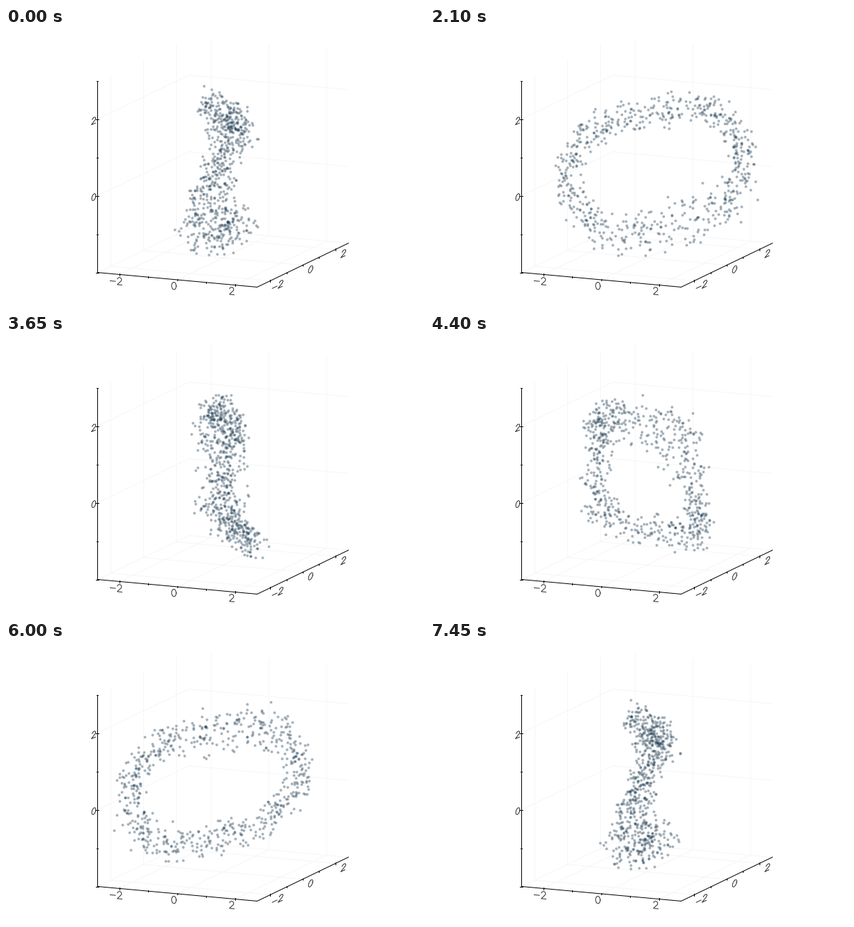
A matplotlib script that plays this animation: 600 by 400 pixels, repeating every 7500 ms.

```python
import numpy as np
import matplotlib.pyplot as plt
from matplotlib.animation import FuncAnimation

FRAMES, INTERVAL = 150, 50
COUNT = 680
PX = 0.72  # one pixel in points
XL, YL, Z0, Z1 = 2.76, 2.8, -2, 3
INK, GRID = "black", "#f6f6f6"

rng = np.random.default_rng(11)


def project(x, y, z):
    """Oblique view: data coordinates to stage pixels."""
    return 311.5 + 41.5 * x + 23.4 * y, 219.5 + 3.8 * x - 11.25 * y - 55 * z


def segment(a, b, color=INK, width=1.0, order=2):
    (xa, ya), (xb, yb) = project(*a), project(*b)
    ax.plot([xa, xb], [ya, yb], color=color, lw=width * PX, zorder=order)


def stroke(char):
    """Single-stroke digit of height 1, with its advance width."""
    if char == "0":
        t = np.linspace(0, 2 * np.pi, 40)
        return np.c_[0.33 + 0.31 * np.cos(t), 0.5 + 0.5 * np.sin(t)], 0.66
    if char == "2":
        t = np.linspace(np.radians(170), np.radians(-40), 20)
        arc = np.c_[0.32 + 0.28 * np.cos(t), 0.72 + 0.28 * np.sin(t)]
        return np.vstack([arc, [[0.02, 0], [0.66, 0]]]), 0.66
    return np.array([[0, 0.43], [0.72, 0.43]]), 0.95


def label(text, center, ex, ey):
    """Text lying along the direction ex, with uprights along ey."""
    glyphs = [stroke(c) for c in text]
    pen = -sum(w for _, w in glyphs) / 2
    for pts, width in glyphs:
        u, v = pts[:, 0] + pen, pts[:, 1] - 0.5
        ax.plot(center[0] + u * ex[0] + v * ey[0],
                center[1] + u * ex[1] + v * ey[1],
                color="#222222", lw=0.95 * PX, zorder=3)
        pen += width


def tick(p, size):
    x, y = project(*p)
    ax.plot([x, x], [y - size, y + size], color=INK, lw=PX, zorder=3)


def draw_box():
    for v in (-2, 0, 2):
        for a, b in [
            ((v, -YL, Z0), (v, YL, Z0)), ((v, YL, Z0), (v, YL, Z1)),
            ((-XL, v, Z0), (XL, v, Z0)), ((-XL, v, Z0), (-XL, v, Z1)),
            ((-XL, -YL, v), (-XL, YL, v)), ((-XL, YL, v), (XL, YL, v)),
        ]:
            segment(a, b, GRID, 1, 1)
    segment((-XL, -YL, Z0), (XL, -YL, Z0))
    segment((XL, -YL, Z0), (XL, YL, Z0))
    segment((-XL, -YL, Z0), (-XL, -YL, Z1))

    for v in range(-2, 3):
        size = 1.4 if v % 2 == 0 else 0.8
        tick((v, -YL, Z0), size)
        tick((XL, v, Z0), size)
    for v in range(Z0, Z1 + 1):
        x, y = project(-XL, -YL, v)
        size = 2.0 if v % 2 == 0 else 1.0
        ax.plot([x - size, x + size], [y, y], color=INK, lw=PX, zorder=3)

    for i, text in enumerate(("−2", "0", "2")):
        label(text, (158 + 83 * i, 362.5 + 7.2 * i), (10.5, 0.95), (0, -10.5))
        label(text, (390 + 47.3 * i, 369 - 23 * i), (9.5, -4.5), (2.2, -10))
    for i, text in enumerate(("0", "2")):
        label(text, (126, 242.5 - 109.7 * i), (9, -3.6), (1.2, -9.5))


def make_cloud():
    """A thick ribbon on edge, widest in depth at its top and bottom."""
    t = rng.uniform(0, 2 * np.pi, COUNT)
    across = 0.25 + 2.7 * np.cos(t)
    depth = (-0.09 + 0.28 * np.cos(t) + 0.29 * np.sin(t)
             - 0.14 * np.sin(2 * t) - 0.23 * np.cos(3 * t))
    height = 0.28 + 1.6 * np.sin(t) + 0.1 * np.sin(3 * t)

    twist = rng.uniform(-1, 1, COUNT) * np.sin(t - np.radians(20))
    across -= 0.37 * twist * np.cos(t)
    depth += 0.62 * twist
    height -= 0.37 * twist * np.sin(t)

    fuzz = rng.normal(size=(3, COUNT))
    fuzz *= 0.46 * rng.random(COUNT) ** (1 / 3) / np.linalg.norm(fuzz, axis=0)
    return across + fuzz[0], depth + fuzz[1], height + fuzz[2]


fig = plt.figure(figsize=(6, 4), dpi=100, facecolor="white")
ax = fig.add_axes([0, 0, 1, 1])
ax.set_xlim(0, 600)
ax.set_ylim(400, 0)
ax.axis("off")
draw_box()

across, depth, height = make_cloud()
dots = ax.scatter(np.zeros(COUNT), np.zeros(COUNT), s=(3.9 * PX) ** 2,
                  color=(0.1, 0.22, 0.3), alpha=0.38, linewidths=0, zorder=5)


def update(i):
    a = np.radians(360 * i / FRAMES - 61)
    x = across * np.cos(a) - depth * np.sin(a)
    y = across * np.sin(a) + depth * np.cos(a)
    dots.set_offsets(np.column_stack(project(x, y, height)))
    return (dots,)


anim = FuncAnimation(fig, update, frames=FRAMES, interval=INTERVAL,
                     repeat=True, repeat_delay=0, blit=False)
plt.show()
```
